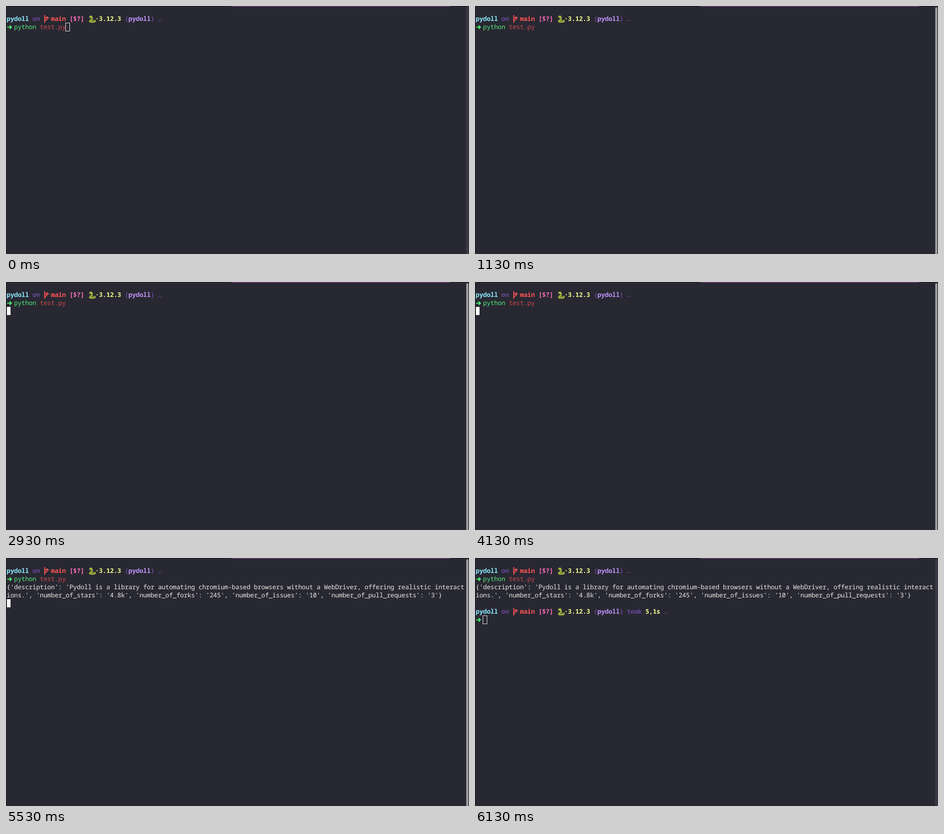
Animation, 1022 px wide and 548 px high, one loop 6.2 s. Source, as an HTML page:

```html
<!DOCTYPE html>
<html lang="en">
<head>
<meta charset="utf-8">
<title>Terminal session</title>
<style>
  html, body { margin: 0; width: 100%; height: 100%; overflow: hidden; background: #282832; }
  svg { display: block; width: 100vw; height: 100vh; }
  text {
    font: 14px "Noto Sans Mono", "DejaVu Sans Mono", monospace;
    letter-spacing: calc(8.145px - .6em);
    white-space: pre;
    text-rendering: geometricPrecision;
  }
  .bold { font-weight: 700; }
</style>
</head>
<body>
<svg id="stage" viewBox="0 0 1022 548" xmlns="http://www.w3.org/2000/svg">
  <defs>
    <g id="branch" fill="none" stroke="#ff5555" stroke-width="2">
      <path d="M85.5 20V37M85.5 33L90.5 29.5V25"/>
      <path d="M87 27.5L90.5 24L94.5 27.5" stroke-width="1.8"/>
    </g>
    <g id="snake" fill="none" stroke-linecap="round" stroke-linejoin="round">
      <path d="M187 24.5Q191 24.5 190 28Q187 31 185 33Q184 35.5 188 35.3H194Q197 34.8 196.5 32" stroke="#a9b83c" stroke-width="3"/>
      <path d="M189 32.5Q191 30.5 193 32.5" stroke="#82a23a" stroke-width="2.4"/>
      <ellipse cx="187.3" cy="23.8" rx="3.4" ry="2.5" fill="#b9c84a"/>
      <circle cx="187.6" cy="23" r=".8" fill="#2f3326"/>
      <path d="M184 25.5L182.8 27" stroke="#d8504c" stroke-width="1"/>
    </g>
    <path id="arrow" d="M2.5 46.8H11M7.8 42.8L12 46.8L7.8 50.8" fill="none" stroke="#50fa7b" stroke-width="1.9"/>
  </defs>
  <rect width="1022" height="548" fill="#282832"/>
  <rect width="1022" height="1" fill="#17171d"/>
  <rect width="1" height="548" fill="#17171d"/>
  <rect x="498" width="482" height="1" fill="#a4479f"/>
  <rect x="1015.5" y="2" width="5.5" height="546" fill="#383944"/>
  <rect id="slider" x="1016" y="3" width="4.5" height="550" rx="2.2" fill="#a2a2a6"/>
  <g id="command"></g>
  <g id="output"></g>
  <g id="prompt"></g>
  <rect id="cursor"/>
</svg>
<script>
const LOOP = 6200, CELL = 8.145, LEFT = 1.5, TOP = 19, ROW = 18;
const FOCUS = 70, ENTER = 530, PRINT = 5530, DONE = 5600, BLUR = 5930;
const FADE = 200, BLINK = 600;
const DIM = "#69489b", WHITE = "#e9e9e5";
const $ = id => document.getElementById(id);

function add(parent, tag, attrs) {
  const el = document.createElementNS("http://www.w3.org/2000/svg", tag);
  for (const key in attrs) el.setAttribute(key, attrs[key]);
  return parent.appendChild(el);
}

function write(parent, row, col, string, fill, bold) {
  const el = add(parent, "text", { x: LEFT + col * CELL, y: TOP + row * ROW + 14, fill });
  if (bold) el.setAttribute("class", "bold");
  el.textContent = string;
}

function drawPrompt(parent, row, took) {
  const bold = (col, string, fill) => write(parent, row, col, string, fill, true);
  bold(0, "pydoll", "#8be9fd");
  bold(7, "on", DIM);
  bold(12, "main", "#ff5555");
  bold(17, "[$?]", "#ff6fbd");
  bold(24, "·3.12.3", "#f1fa8c");
  bold(32, "(", DIM);
  bold(33, "pydoll", "#bd93f9");
  bold(39, ")", DIM);
  if (took) {
    bold(41, "took", DIM);
    bold(46, took, "#f1fa8c");
  }
  write(parent, row, took ? 51 : 41, "…", DIM);
  for (const id of ["branch", "snake", "arrow"])
    add(parent, "use", { href: "#" + id, y: row * ROW });
}

drawPrompt($("command"), 0);
write($("command"), 1, 2, "python", "#50e878");
write($("command"), 1, 9, "test.py", "#cf484b");
write($("output"), 2, 0, "{'description': 'Pydoll is a library for automating chromium-based browsers without a WebDriver, offering realistic interact", WHITE);
write($("output"), 3, 0, "ions.', 'number_of_stars': '4.8k', 'number_of_forks': '245', 'number_of_issues': '10', 'number_of_pull_requests': '3'}", WHITE);
drawPrompt($("prompt"), 5, "5,1s");

function show(el, on) {
  el.setAttribute("visibility", on ? "visible" : "hidden");
}

function drawCursor(row, col, solid) {
  const x = Math.round(LEFT + col * CELL), y = TOP + row * ROW;
  const box = solid
    ? { x, y, width: 8, height: 18, fill: "#fbfbf8", stroke: "none" }
    : { x: x - .5, y: y + .5, width: 9, height: 18, fill: "none", stroke: "#f4f4f0" };
  for (const key in box) $("cursor").setAttribute(key, box[key]);
}

// Eased progress of the scrollbar fade from a start time.
function fade(t, start) {
  const p = Math.min(1, Math.max(0, (t - start) / FADE));
  return 1 - (1 - p) ** 2;
}

function render(t) {
  const focused = t >= FOCUS && t < BLUR;
  const [row, col] = t < ENTER ? [1, 16] : t < PRINT ? [2, 0] : t < DONE ? [4, 0] : [6, 2];
  drawCursor(row, col, focused);
  const lit = t < ENTER || Math.floor((t - ENTER) / BLINK) % 2 === 0;
  show($("cursor"), !focused || lit);
  show($("output"), t >= PRINT);
  show($("prompt"), t >= DONE);
  $("slider").setAttribute("opacity", fade(t, FOCUS) - fade(t, BLUR));
}

const start = performance.now();
function tick() {
  render((performance.now() - start) % LOOP);
  requestAnimationFrame(tick);
}
tick();
</script>
</body>
</html>
```
